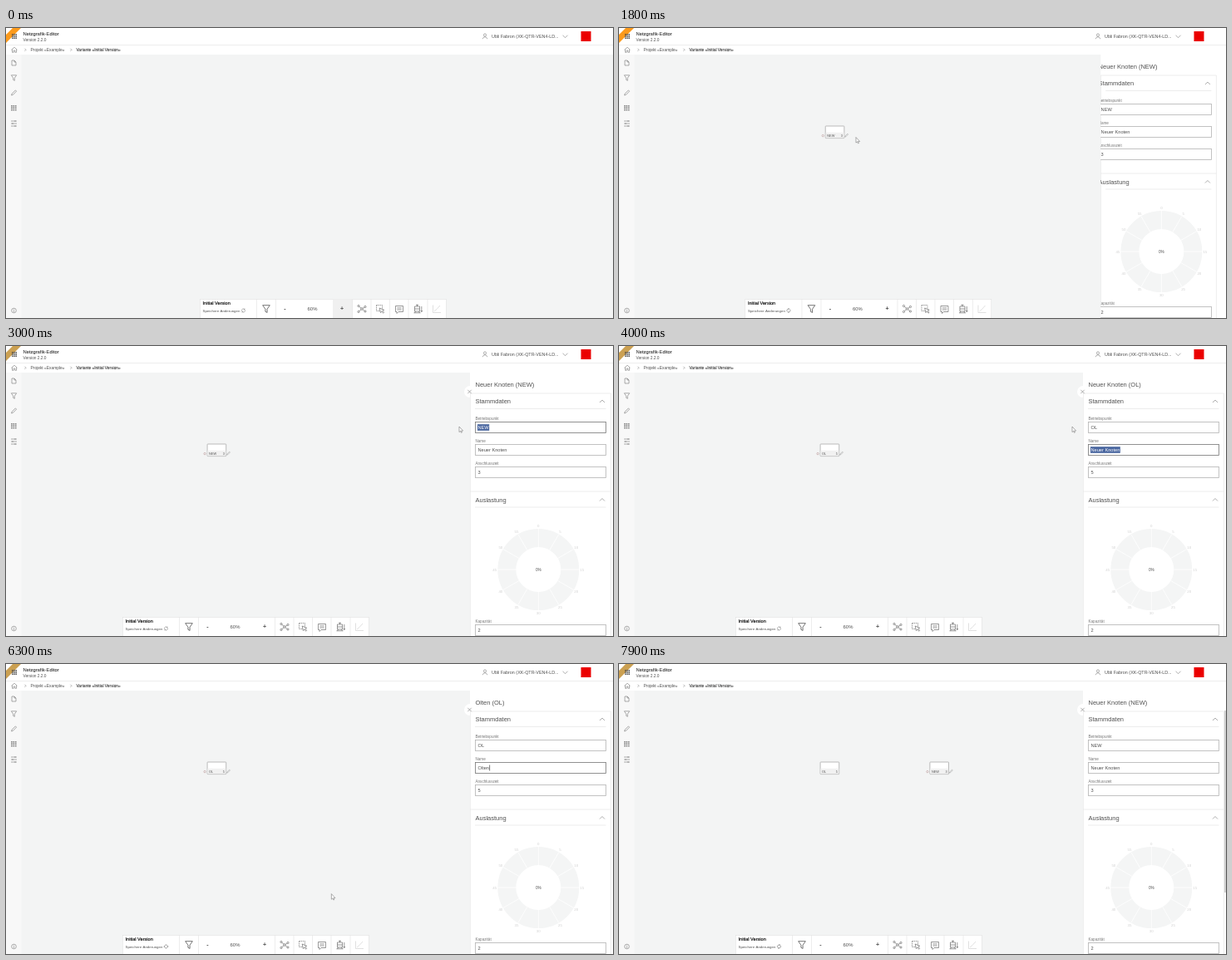
An HTML page that plays this animation: 730x349 px, repeating every 8 s.

```html
<!DOCTYPE html>
<html lang="de">
<head>
<meta charset="utf-8">
<title>Netzgrafik-Editor</title>
<style>
  html, body { margin: 0; width: 100%; height: 100%; overflow: hidden; background: #fff; }
  svg { display: block; width: 730px; height: 349px; font-family: "Liberation Sans", Arial, sans-serif; }
  text { fill: #505050; }
  .icon { fill: none; stroke: #777; stroke-width: .6; }
  .line { stroke: #e6e6e6; stroke-width: .7; }
  .small { font-size: 4.6px; fill: #777; }
  .head { font-size: 7.5px; }
  .strong { fill: #333; stroke: #333; stroke-width: .08; }
  .tiny { font-size: 3.9px; }
</style>
</head>
<body>
<svg id="stage" viewBox="0 0 730 349">
  <defs>
    <clipPath id="panelClip"><rect id="clipBox" y="32" width="180" height="317"/></clipPath>
    <path id="filter" d="M-3.2 -3.2H3.2L.8 .2V3.3L-.8 2.4V.2Z"/>
    <path id="pencil" d="M-3 3L-2.3 .9L1.9 -3.1L3.1 -1.9L-1 2.3Z"/>
    <path id="chevron" d="M-3 1.5L0 -1.5L3 1.5"/>
  </defs>

  <rect width="730" height="349" fill="#fff"/>
  <rect y="32" width="730" height="317" fill="#f3f4f4"/>
  <rect y="32" width="18.5" height="317" fill="#f8f8f8"/>
  <path class="line" d="M0 20.5H730"/>

  <path id="ribbon" d="M0 8L8 0H18L0 18Z"/>
  <g id="appGrid" fill="#444"></g>
  <text x="20.5" y="9" font-size="5.8" class="strong">Netzgrafik-Editor</text>
  <text x="20.5" y="16" font-size="4.8">Version 2.2.0</text>
  <g class="icon">
    <circle cx="576" cy="8.5" r="1.6"/><path d="M573.3 13.2C573.5 10 578.5 10 578.7 13.2"/>
    <path d="M669.5 8.7L672.5 11.7L675.5 8.7"/>
  </g>
  <text x="584" y="12" font-size="5.4">Ubli Fabron (XK-QTR-VEN4-LD...</text>
  <rect x="691.5" y="4" width="12" height="12" fill="#eb0000"/>

  <text x="29.5" y="28" font-size="4.9">Projekt «Example»</text>
  <text x="84.5" y="28" font-size="4.85" class="strong">Variante «Initial Version»</text>
  <g class="icon">
    <path d="M22.5 24.8L24 26.3L22.5 27.8M77.5 24.8L79 26.3L77.5 27.8"/>
    <path d="M6.5 26.3L10 23.2L13.5 26.3M7.5 25.7V29.3H9.2V27H10.8V29.3H12.5V25.7"/>
    <path d="M7 39H10L12 41V45H7ZM10 39V41H12"/>
    <use href="#filter" x="9.5" y="60"/>
    <use href="#pencil" x="9.5" y="78"/>
    <path d="M6 112H13M6 115H13M6 118H13M11 111V113M8 114V116M11 117V119"/>
    <circle cx="9.5" cy="340" r="2.8"/><path d="M9.5 338.2V338.8M9.5 339.5V341.8"/>
  </g>
  <g id="sideGrid" fill="#888"></g>

  <g id="nodes"></g>

  <g id="toolbar">
    <rect x=".3" y="326.3" width="296" height="23" fill="#fff" stroke="#e2e2e2" stroke-width=".6"/>
    <rect id="plusHover" x="160" y="326.6" width="24" height="23" fill="#f0f0f0"/>
    <rect id="netHover" x="182.3" y="326.6" width="23" height="23" fill="#e9e9e9"/>
    <path class="line" d="M68.5 326V349M91.5 326V349M183.5 326V349M206 326V349M228.5 326V349M251 326V349M274 326V349"/>
    <text x="3.5" y="333.3" font-size="5.6" style="fill:#222;stroke:#222;stroke-width:.22">Initial Version</text>
    <text x="3.5" y="341.7" font-size="4.4">Speichere Änderungen</text>
    <g id="spinner" class="icon"><path d="M-2 .4A2 2 0 0 1 1.4 -1.4M2 -.4A2 2 0 0 1 -1.4 1.4M1.6 -2.3V-1.2H.5M-1.6 2.3V1.2H-.5"/></g>
    <text x="102.5" y="340" font-size="7" font-weight="bold" text-anchor="middle">-</text>
    <text x="135.5" y="339.8" font-size="5.9" text-anchor="middle">60%</text>
    <text x="171" y="340" font-size="7" font-weight="bold" text-anchor="middle">+</text>
    <g class="icon" style="stroke:#555">
      <use href="#filter" transform="translate(80 338) scale(1.35)"/>
      <g transform="translate(195 338)">
        <circle r="1.3"/><circle cx="-4" cy="-3.5" r="1.1"/><circle cx="-4" cy="3.5" r="1.1"/><circle cx="4" cy="-2.5" r="1.1"/><circle cx="4" cy="3" r="1.1"/>
        <path d="M-3.2 -2.7L-1 -.9M-3.2 2.7L-1 .9M3 -2L1.2 -.6M3 2.5L1.1 .8"/>
      </g>
      <g transform="translate(217 338)">
        <rect x="-4.5" y="-4.5" width="7" height="7" stroke-dasharray="1.4 .8"/>
        <path d="M-.8 -1L.4 4.6L1.8 3L3.6 5.2L4.6 4.3L2.8 2.2L4.7 1.3Z" fill="#fff"/>
      </g>
      <path d="M235.5 334.5H244.5V341.5H239L237 343.5V341.5H235.5ZM237.3 336.9H242.7M237.3 339H242.7"/>
      <g transform="translate(262.5 338)">
        <path d="M-4 -3H2V3H-4ZM-4 0H2M-2.5 -4.8H.5M-1 -4.8V-3M-5 4.8H3M-3 3L-4 4.8M1 3L2 4.8M4.3 -3V3.5M3.3 2L4.3 3.5L5.3 2"/>
      </g>
      <path d="M280.5 333.5V342.5H290M282 341L285 338.5L289 334" style="stroke:#ccc"/>
    </g>
  </g>

  <g id="panel" clip-path="url(#panelClip)">
    <rect id="panelBack" y="32" width="180" height="317" fill="#fff"/>
    <path id="rules" class="line"/>
    <path id="edge" class="line"/>
    <g id="content">
      <text id="title" x="564.5" y="49" class="head"></text>
      <text x="564.5" y="69.4" class="head">Stammdaten</text>
      <text x="564.5" y="187.8" class="head">Auslastung</text>
      <g id="fields"></g>
      <g id="wheel"></g>
    </g>
    <g id="chevrons" class="icon"><use href="#chevron" x="717" y="66.5"/><use href="#chevron" x="717" y="185"/></g>
  </g>
  <g id="closeButton">
    <path d="M558 48A7 7 0 0 0 558 62Z" fill="#fff"/>
    <path class="icon" d="M555.3 52.8L559.7 57.2M559.7 52.8L555.3 57.2"/>
  </g>
  <rect id="scrollbar" x="728" y="56" width="2" height="219" fill="#d0d0d0"/>

  <path id="arrow" d="M0 0V6.6L1.5 5.3L2.5 7.4L3.4 7L2.5 5H4.6Z" fill="#fff" stroke="#777" stroke-width=".6"/>
  <path id="hand" d="M-.8 0Q0 -1 .8 0V3L4 4Q4.6 5 3.8 9H-.6L-3 5.6Q-2.6 4.5 -.8 6Z" fill="#fff" stroke="#444" stroke-width=".6"/>
</svg>
<script>
const LOOP = 8000, PANEL_WIDTH = 172;
const $ = id => document.getElementById(id);

function add(parent, tag, attrs = {}, text = '') {
  const el = document.createElementNS('http://www.w3.org/2000/svg', tag);
  setAttrs(el, attrs);
  el.textContent = text;
  return parent.appendChild(el);
}
function setAttrs(el, attrs) {
  for (const key in attrs) el.setAttribute(key, attrs[key]);
}
const show = (el, on) => el.setAttribute('display', on ? 'inline' : 'none');
const move = (el, x, y) => el.setAttribute('transform', `translate(${x} ${y})`);
const clamp = v => Math.max(0, Math.min(1, v));

function dotGrid(parent, cx, cy, size, step) {
  for (let i = 0; i < 9; i++) {
    add(parent, 'rect', {
      x: cx + (i % 3 - 1) * step - size / 2, y: cy + (Math.floor(i / 3) - 1) * step - size / 2,
      width: size, height: size
    });
  }
}
dotGrid($('appGrid'), 10, 10, 1.5, 2.2);
dotGrid($('sideGrid'), 9.3, 96.2, 1.7, 2.4);

function makeField(label, top) {
  const g = $('fields');
  add(g, 'text', { x: 564.5, y: top - 2.7, class: 'small' }, label);
  return {
    box: add(g, 'rect', { x: 564.5, y: top, height: 13, fill: '#fff', 'stroke-width': .8 }),
    mark: add(g, 'rect', { x: 567, y: top + 2.7, height: 7.6, fill: '#48659f' }),
    text: add(g, 'text', { x: 567.5, y: top + 8.6, 'font-size': 5.65 }),
    caret: add(g, 'rect', { y: top + 3, width: .6, height: 7, fill: '#222' })
  };
}
const fields = {
  code: makeField('Betriebspunkt', 91.5),
  name: makeField('Name', 118.5),
  time: makeField('Anschlusszeit', 145.5),
  capacity: makeField('Kapazität', 335.5)
};

function updateField(field, value, { focus = false, selected = 0, caret = false } = {}, width) {
  field.text.textContent = value;
  field.text.style.fill = selected > .5 ? '#fff' : '#505050';
  setAttrs(field.box, { width, stroke: focus ? '#777' : '#b4b4b4' });
  show(field.mark, selected > 0);
  show(field.caret, caret);
  if (!selected && !caret) return;
  const length = field.text.getComputedTextLength();
  setAttrs(field.mark, { x: 567 + (length + 1) * (1 - selected), width: (length + 1) * selected });
  field.caret.setAttribute('x', 568 + length);
}

function makeWheel() {
  const g = $('wheel'), cx = 640.3, cy = 269;
  const at = (i, r) => [cx + r * Math.sin(i * Math.PI / 6), cy - r * Math.cos(i * Math.PI / 6)];
  add(g, 'circle', { cx, cy, r: 38, fill: 'none', stroke: '#f4f5f5', 'stroke-width': 22 });
  for (let i = 0; i < 12; i++) {
    add(g, 'path', { d: `M${at(i, 27)}L${at(i, 49)}`, stroke: '#fff', 'stroke-width': .8 });
    const [x, y] = at(i, 52.5);
    add(g, 'text', { x, y: y + 1.5, 'font-size': 4.4, 'text-anchor': 'middle', style: 'fill:#cfcfcf' }, i * 5);
  }
  add(g, 'text', { x: cx, y: cy + 1.7, 'font-size': 4.7, 'text-anchor': 'middle' }, '0%');
}
makeWheel();

function makeNode() {
  const g = add($('nodes'), 'g');
  add(g, 'rect', { x: .4, y: .4, width: 22.6, height: 14.6, rx: .6, fill: '#fff', stroke: '#a0a0a0', 'stroke-width': .7 });
  add(g, 'rect', { x: .8, y: 8.2, width: 21.8, height: 6.5, fill: '#f1f1f1' });
  const label = add(g, 'text', { x: 2.4, y: 13.3, class: 'tiny' });
  const time = add(g, 'text', { x: 19, y: 13.3, class: 'tiny' });
  const tools = add(g, 'g', { class: 'icon' });
  add(tools, 'circle', { cx: -2.6, cy: 12, r: 1.2, stroke: '#b99' });
  add(tools, 'use', { href: '#pencil', transform: 'translate(25.8 11.6) scale(.65)' });
  return { g, label, time, tools };
}
const nodes = [makeNode(), makeNode()];

function updateNode(node, visible, x, label, time, active) {
  show(node.g, visible);
  move(node.g, x, 117.6);
  node.label.textContent = label;
  node.time.textContent = time;
  show(node.tools, active);
}

// Pointer stops: time, x, y
const stops = [
  [100, 405, 337], [300, 405, 337], [1200, 285, 131.5], [1900, 285, 131.5],
  [2500, 583, 97], [2650, 583, 97], [2900, 545, 97], [5700, 545, 97],
  [6600, 338, 339], [6900, 338, 339], [7400, 373, 129], [8000, 373, 129]
];
function pointerAt(t) {
  const i = Math.max(1, stops.findIndex(s => s[0] > t));
  const [t0, x0, y0] = stops[i - 1], [t1, x1, y1] = stops[i];
  const u = clamp((t - t0) / (t1 - t0)), e = u * u * (3 - 2 * u);
  return [x0 + (x1 - x0) * e, y0 + (y1 - y0) * e];
}

const typed = (word, t, start, step) => word.slice(0, Math.max(0, Math.floor((t - start) / step) + 1));

function updatePanel(t, open, second) {
  const off = PANEL_WIDTH * (1 - open), left = 558 + off, right = -.43 * off;
  show($('panel'), open > 0);
  show($('closeButton'), open === 1);
  show($('scrollbar'), second);
  $('clipBox').setAttribute('x', left);
  $('panelBack').setAttribute('x', left);
  move($('content'), .57 * off, 0);
  move($('chevrons'), right, 0);
  const end = 727.5 + right;
  $('rules').setAttribute('d', `M${left} 57H${end}M${left + 6} 75.5H${end - 6}M${left} 175H${end}M${left + 6} 194H${end - 6}`);
  $('edge').setAttribute('d', `M${end} 57V349M${left + .4} 57V349`);

  const fresh = t < 3200 || second;
  const code = fresh ? 'NEW' : typed('OL', t, 3200, 200);
  const name = t < 4500 || second ? 'Neuer Knoten' : typed('Olten', t, 4500, 200);
  const time = t < 3700 || second ? '3' : '5';
  const width = Math.max(0, 157 - off);
  const codeFocus = t >= 2500 && t < 3700, nameFocus = t >= 3700 && !second;
  $('title').textContent = `${name} (${code})`;
  updateField(fields.code, code, {
    focus: codeFocus, selected: codeFocus && fresh ? clamp((t - 2650) / 250) : 0, caret: codeFocus && !fresh
  }, width);
  updateField(fields.name, name, {
    focus: nameFocus, selected: nameFocus && t < 4500 ? 1 : 0,
    caret: nameFocus && t >= 4500 && (t < 5600 || t % 1000 < 500)
  }, width);
  updateField(fields.time, time, {}, width);
  updateField(fields.capacity, '2', {}, width);
  return { code, time };
}

function render(t) {
  const open = 1 - (1 - clamp((t - 1600) / 400)) ** 3;
  const second = t >= 7500;
  const { code, time } = updatePanel(t, open, second);

  updateNode(nodes[0], t >= 1500, 241.7 + 50 * (1 - open), second ? 'OL' : code, second ? '5' : time, !second);
  updateNode(nodes[1], second, 373.5, 'NEW', '3', true);

  move($('toolbar'), 233 - 93 * open, 0);
  $('spinner').setAttribute('transform', `translate(52.5 340) rotate(${t * .18})`);
  show($('plusHover'), t < 500);
  show($('netHover'), t >= 6450 && t < 7000);
  $('ribbon').setAttribute('fill', t < 2700 ? '#fb9a1c' : '#cba052');

  const [x, y] = pointerAt(t);
  const visible = t >= 100 && !(t >= 4500 && t < 5700) && t < 7750;
  const onButton = y > 327;
  move($('arrow'), x, y);
  move($('hand'), x, y);
  show($('arrow'), visible && !onButton);
  show($('hand'), visible && onButton);
}

const start = performance.now();
function tick() {
  render((performance.now() - start) % LOOP);
  requestAnimationFrame(tick);
}
tick();
</script>
</body>
</html>
```
